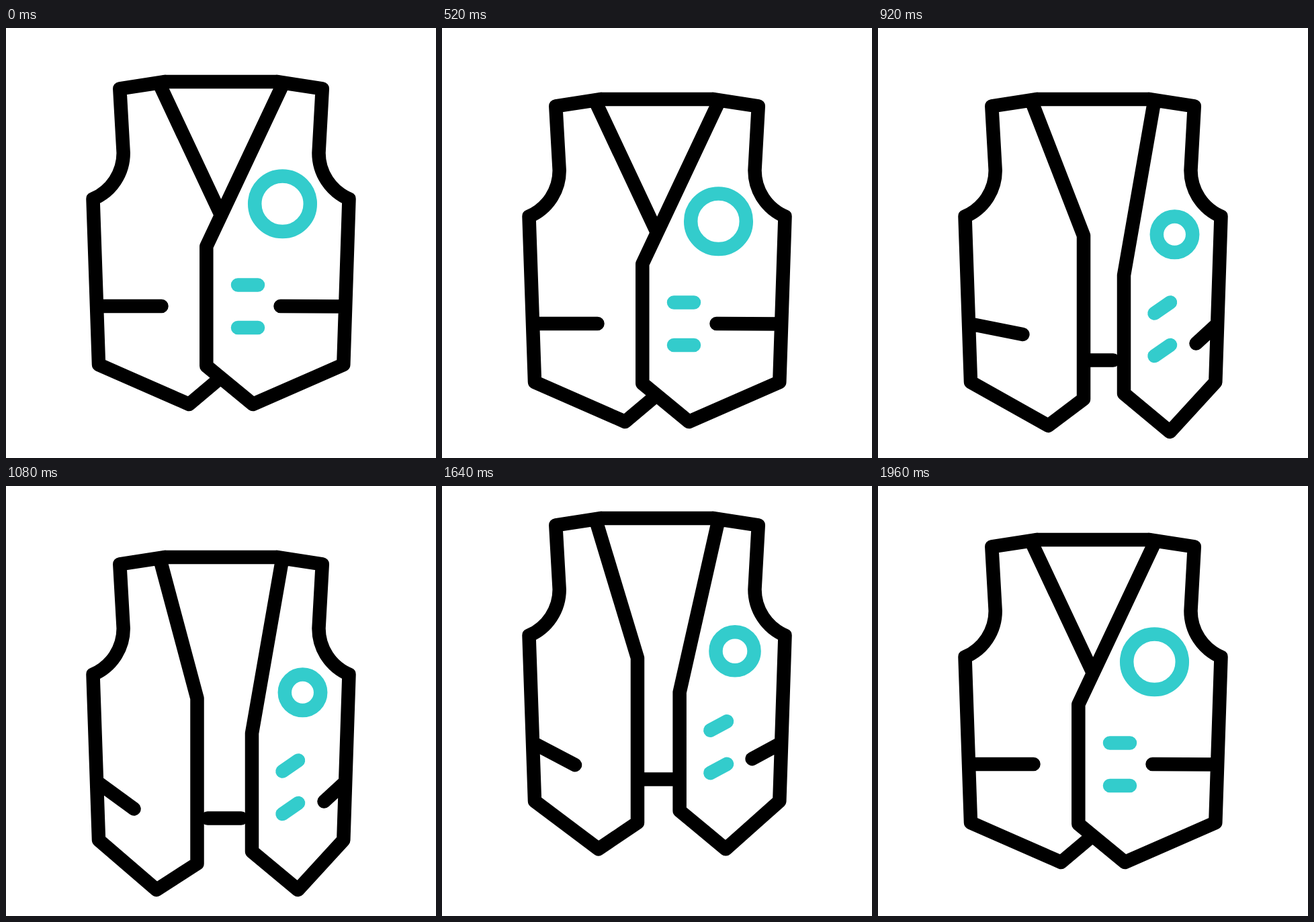
Write an HTML page that moves like this. It is 640x640 px and loops after 2 s.

```html
<!DOCTYPE html>
<html>
<head>
<meta charset="utf-8">
<style>
  html, body { margin: 0; height: 100%; overflow: hidden; background: #fff; }
  svg { display: block; width: 100vw; height: 100vh; }
  path, circle { fill: #fff; stroke: #000; stroke-width: 20.5; stroke-linecap: round; stroke-linejoin: round; }
  .teal { stroke: #3cc; }
</style>
</head>
<body>
<svg viewBox="0 0 640 640">
  <g id="vest">
    <path d="M300 468.5H350"/>
    <path id="left"/>
    <path id="right"/>
    <path d="M237 80H403"/>
    <circle id="ring" class="teal"/>
    <path id="buttons" class="teal"/>
  </g>
</svg>
<script>
const FRAME = 40, FRAMES = 50;
const el = id => document.getElementById(id);
const set = (id, attrs) => {
  for (const name in attrs) el(id).setAttribute(name, attrs[name]);
};
const mix = (a, b, k) => a + (b - a) * k;

// Eased progress from 0 to 1 between two frames
function ease(n, start, end) {
  const u = Math.min(1, Math.max(0, (n - start) / (end - start)));
  return u * u * (3 - 2 * u);
}

// Point between its closed and open positions
const point = (x0, y0, x1, y1, k) => `${mix(x0, x1, k)} ${mix(y0, y1, k)}`;

function leftPanel(k) {
  return `M230.5 88L${point(320, 278.5, 284.5, 290, k)}L${point(320, 520, 284.5, 536, k)}
    L${point(272.5, 560, 224, 575, k)}L138 501L129.5 254.5A74.5 74.5 0 0 0 174.7 186
    L169.3 90.3L237 80M135 414L${point(231.5, 414, 190.5, 454.5, k)}`;
}

function rightPanel(k) {
  return `M410.5 87L${point(298.3, 325, 366, 342, k)}L${point(298.3, 503, 366, 518, k)}
    L${point(367.5, 560, 434.5, 575, k)}L502.3 501L510.5 254.5A74.5 74.5 0 0 1 465.5 186
    L470.8 90.3L403 80M505 414.5L${point(408.5, 414, 473.5, 443.5, k)}`;
}

const button = (y, k) =>
  `M${point(345, y, 411.5, y + 16.2, k)}L${point(375, y, 435, y, k)}`;

function draw(now) {
  const n = Math.floor(now / FRAME) % FRAMES;
  const closing = ease(n, 38, 49);
  const openLeft = ease(n, 20, 27) - closing;
  const openRight = ease(n, 13, 20) - closing;
  const shrink = ease(n, 13, 20) - ease(n, 39, 48);
  const y = -32 * ease(n, 3, 8) + 58 * ease(n, 8, 13)
    - 58 * ease(n, 36, 41) + 32 * ease(n, 41, 46);

  set('vest', { transform: `translate(0 ${y})` });
  set('left', { d: leftPanel(openLeft) });
  set('right', { d: rightPanel(openRight) });
  set('buttons', { d: button(382.4, openRight) + button(445.9, openRight) });
  set('ring', {
    cx: mix(411.5, 441.5, openRight),
    cy: mix(261.7, 281.3, openRight),
    r: mix(41.3, 26.7, shrink)
  });
  requestAnimationFrame(draw);
}
draw(0);
</script>
</body>
</html>
```
